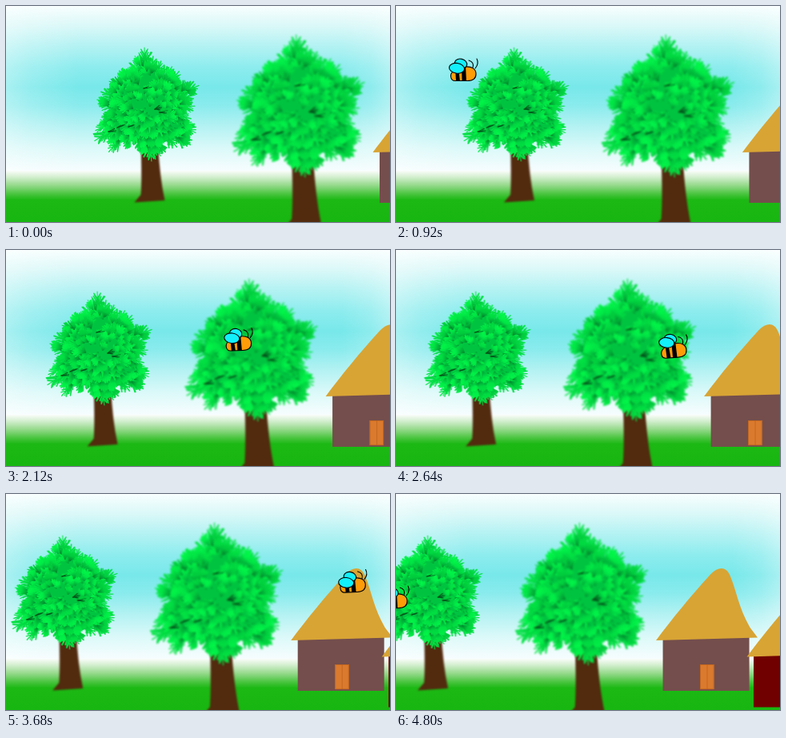
Animation of 480 by 270 pixels, one loop 4840 ms. Source, as an HTML page with a canvas:

```html
<!DOCTYPE html>
<html lang="en">
<head>
<meta charset="utf-8">
<title>Bee in the garden</title>
<style>
html, body { margin: 0; height: 100%; overflow: hidden; background: #fff; }
canvas { display: block; width: 100vw; height: 100vh; }
</style>
</head>
<body>
<canvas id="stage" width="480" height="270"></canvas>
<script>
const LOOP = 4840, STEP = 40, SCROLL = 27.8 / 1000, BEE_LOOP = 4320, FLAP = 160;
const ctx = document.getElementById('stage').getContext('2d');

function makeCanvas(width, height, draw) {
  const canvas = document.createElement('canvas');
  canvas.width = width;
  canvas.height = height;
  draw(canvas.getContext('2d'));
  return canvas;
}

function gradientRect(g, x, y, w, h, stops, horizontal) {
  const fill = horizontal ? g.createLinearGradient(x, 0, x + w, 0)
                          : g.createLinearGradient(0, y, 0, y + h);
  stops.forEach(([at, color]) => fill.addColorStop(at, color));
  g.fillStyle = fill;
  g.fillRect(x, y, w, h);
}

const backdrop = makeCanvas(480, 270, g => {
  gradientRect(g, 0, 0, 480, 207, [[0, '#f8fefe'], [.12, '#daf8f8'], [.24, '#b4f2f3'],
    [.37, '#8decee'], [.49, '#78e8ea'], [.6, '#8aebed'], [.73, '#b5f2f3'],
    [.86, '#dbf9f9'], [1, '#f8fdfe']]);
  gradientRect(g, 0, 0, 90, 207, [[0, '#ffffff5c'], [.35, '#ffffff30'], [1, '#fff0']], true);
  gradientRect(g, 420, 0, 60, 207, [[0, '#fff0'], [.6, '#ffffff28'], [1, '#ffffff5c']], true);
  gradientRect(g, 0, 206, 480, 64, [[0, '#fafdfa'], [.14, '#cdecc8'], [.3, '#8ed884'],
    [.45, '#4ac540'], [.57, '#1cb814'], [1, '#18b610']]);
});

// Crown outline around the crown centre.
const CROWN = [[-2, -76], [9, -65], [19, -59], [20, -50], [33, -52], [42, -46], [43, -34],
  [67, -28], [61, -16], [51, -12], [62, -2], [57, 14], [63, 32], [56, 47], [39, 50],
  [18, 58], [7, 68], [-8, 57], [-26, 52], [-47, 56], [-46, 45], [-65, 42], [-64, 29],
  [-54, 17], [-60, -3], [-57, -20], [-42, -37], [-31, -49], [-13, -62]];

function seededRandom(seed) {
  return () => (seed = seed * 16807 % 2147483647) / 2147483647;
}

// A feathery sprig: a stem with slanted leaflets on both sides.
function drawFrond(g, rand, x, y, angle, length, light) {
  const fill = g.createLinearGradient(x, y, x + Math.cos(angle) * length, y + Math.sin(angle) * length);
  fill.addColorStop(0, `hsl(140 100% ${light - 13}%)`);
  fill.addColorStop(.5, `hsl(138 100% ${light}%)`);
  fill.addColorStop(1, `hsl(137 98% ${light + 3}%)`);
  g.strokeStyle = fill;
  const stroke = (from, turn, len) => {
    const sx = x + Math.cos(angle) * from, sy = y + Math.sin(angle) * from;
    g.lineWidth = 1 + rand() * .9;
    g.beginPath();
    g.moveTo(sx, sy);
    g.lineTo(sx + Math.cos(angle + turn) * len, sy + Math.sin(angle + turn) * len);
    g.stroke();
  };
  stroke(0, 0, length);
  for (let i = 0; i < 5; i++) {
    for (const side of [-1, 1]) {
      const from = length * i * .15;
      stroke(from, side * (.35 + rand() * .35), (length - from) * (.6 + rand() * .35));
    }
  }
}

function makeTree(scale) {
  return makeCanvas(Math.ceil(150 * scale), Math.ceil(210 * scale), g => {
    const rand = seededRandom(4177);
    g.scale(scale, scale);
    g.translate(75, 80);
    g.filter = `blur(${scale}px)`;
    g.fillStyle = '#522a0e';
    g.fill(new Path2D('M-6.5 45 Q-5 90 -6.5 109 L-14.5 118.5 L23.5 116 Q17 86 15 45Z'));
    g.filter = 'none';

    const crown = new Path2D('M' + CROWN.map(([x, y]) => [x * .8, y * .8]).join('L') + 'Z');
    const leaves = makeCanvas(g.canvas.width, g.canvas.height, l => {
      l.setTransform(g.getTransform());
      l.lineCap = 'round';
      l.fillStyle = '#00c440';
      l.fill(crown);
      CROWN.forEach(([x, y]) => {
        const r = Math.hypot(x, y), k = (r - 22) / r;
        drawFrond(l, rand, x * k, y * k, Math.atan2(y, x), 21, 43);
      });
      for (let n = 0; n < 210;) {
        const x = rand() * 130 - 65, y = rand() * 140 - 70;
        if (!l.isPointInPath(crown, (x + 75) * scale, (y + 80) * scale)) continue;
        const angle = Math.atan2(y, x) + (rand() - .5) * 1.8;
        drawFrond(l, rand, x, y, angle, 9 + rand() * 7, 39 + rand() * 8);
        n++;
      }
      // Dark gaps between the branches.
      l.strokeStyle = '#004a18';
      [[17, 6], [-36, 25], [-47, 30], [-3, -24], [11, 2], [-22, 24]].forEach(([x, y]) => {
        for (let i = 0; i < 4; i++) {
          l.lineWidth = .5 + rand() * .6;
          l.beginPath();
          l.moveTo(x, y);
          l.lineTo(x + 4 + rand() * 6, y - 5 + rand() * 6);
          l.stroke();
        }
      });
    });
    g.setTransform(1, 0, 0, 1, 0, 0);
    g.filter = `blur(${.75 * scale}px)`;
    g.drawImage(leaves, 0, 0);
  });
}

const smallTree = makeTree(1), bigTree = makeTree(1.25);

const ROOF = new Path2D('M-8.5 1 C10 -24 36 -56 60 -82 C69 -91 79 -92 84 -80 ' +
  'C92 -61 95 -39 109 -15 L118.5 -2.5Z');
const WALL = new Path2D('M0 0 L108 -3 V64 H0Z');

function drawHouse(x, y, wall, door) {
  ctx.save();
  ctx.translate(x, y);
  ctx.fillStyle = wall;
  ctx.fill(WALL);
  ctx.fillStyle = '#d8a434';
  ctx.fill(ROOF);
  if (door) {
    ctx.fillStyle = '#da7a2e';
    ctx.fillRect(46.5, 31, 17.5, 31);
    ctx.strokeStyle = '#c0641c';
    ctx.lineWidth = .8;
    ctx.strokeRect(47, 31.5, 16.5, 30.3);
    ctx.beginPath();
    ctx.moveTo(55.5, 31);
    ctx.lineTo(55.5, 62);
    ctx.stroke();
  }
  ctx.restore();
}

// Flight path: time, x, y, tilt in degrees.
const FLIGHT = [[0, -100, 145, 0], [480, -2, 134, 0], [920, 84, 85, 0], [1600, 223, 104.5, 0],
  [2640, 347, 126, -4], [3240, 403, 120, -2], [4120, 461, 108, -3], [4320, 473, 105, -3]];

function flightAt(t) {
  const last = FLIGHT.length - 1;
  let i = 0;
  while (i < last - 1 && t >= FLIGHT[i + 1][0]) i++;
  const a = FLIGHT[i], b = FLIGHT[i + 1];
  const span = b[0] - a[0], u = (t - a[0]) / span;
  const slope = (k, c) => {
    const p = FLIGHT[Math.max(k - 1, 0)], n = FLIGHT[Math.min(k + 1, last)];
    return (n[c] - p[c]) / (n[0] - p[0]) * span;
  };
  return [1, 2, 3].map(c => {
    const m = slope(i, c), n = slope(i + 1, c), d = b[c] - a[c];
    return a[c] + u * (m + u * (3 * d - 2 * m - n + u * (m + n - 2 * d)));
  });
}

const BODY = new Path2D('M-15.5 3 C-16 -3 -8 -8 2 -9 C11 -10 16 -6 16 0 ' +
  'C16 6 12 8.5 5 8.5 H-10 Q-15 8.5 -15.5 3Z');
const STRIPES = new Path2D('M-10 -8 L-6 -8 L-4 9 L-9 9Z M-2 -10 L3 -10 L4 9 L-1.5 9Z');
const FEELERS = new Path2D('M12 -8 Q14 -15 7 -17 M15 -7 Q20 -13 17 -19');

function drawWing(x, y, rx, ry, angle) {
  ctx.beginPath();
  ctx.ellipse(x, y, rx, ry, angle, 0, Math.PI * 2);
  ctx.fillStyle = '#12f0fc';
  ctx.fill();
  ctx.stroke();
}

function drawBee(t) {
  const [x, y, tilt] = flightAt(t);
  const flap = Math.cos(t / FLAP * Math.PI * 2);
  ctx.save();
  ctx.translate(x, y);
  ctx.rotate(tilt * Math.PI / 180);
  ctx.strokeStyle = '#000';
  ctx.lineWidth = 1.1;
  ctx.lineCap = 'round';
  ctx.fillStyle = '#ff9c08';
  ctx.fill(BODY);
  ctx.save();
  ctx.clip(BODY);
  ctx.fillStyle = '#000';
  ctx.fill(STRIPES);
  ctx.restore();
  ctx.stroke(BODY);
  ctx.stroke(FEELERS);
  drawWing(-3, -12.8 + 2 * flap, 7.8, 6, .25);
  drawWing(-8, -7.2 + 3.5 * flap, 9.6, 6.3, .15);
  ctx.restore();
}

function render(t) {
  const shift = -t * SCROLL;
  ctx.drawImage(backdrop, 0, 0);
  ctx.drawImage(smallTree, 100 + shift, 47);
  ctx.drawImage(bigTree, 271.5 + shift, 30);
  drawHouse(467 + shift, 182, '#744e4c', true);
  drawHouse(580.5 + shift, 202.5, '#700000', false);
  drawBee(t % BEE_LOOP);
}

const start = performance.now();
function tick() {
  const t = (performance.now() - start) % LOOP;
  render(Math.floor(t / STEP) * STEP);
  requestAnimationFrame(tick);
}
tick();
</script>
</body>
</html>
```
